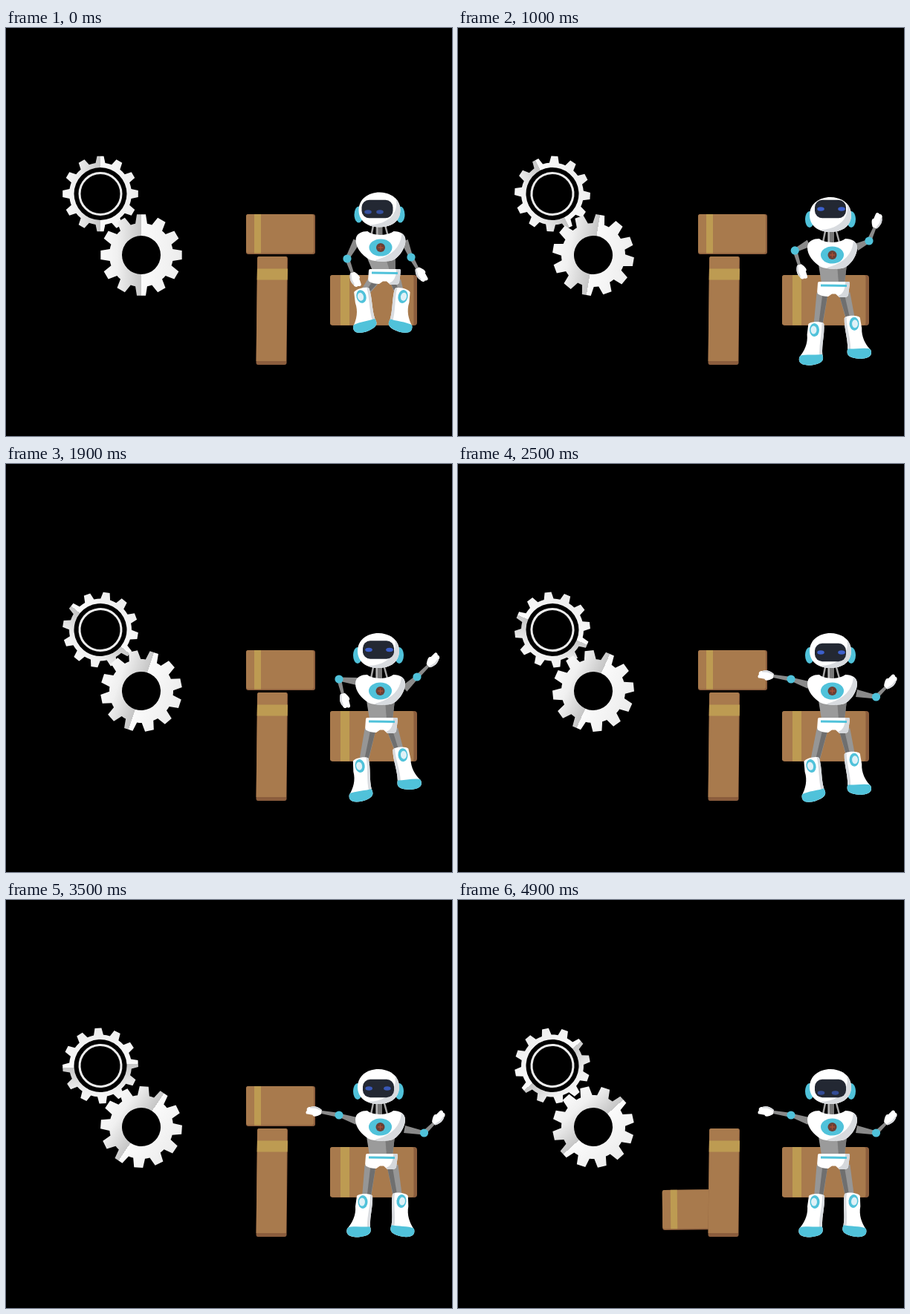
Write an HTML page that moves like this. It is 600 by 550 pixels and loops after 5000 ms.

```html
<!DOCTYPE html>
<html lang="en">
<head>
<meta charset="utf-8">
<title>Robot and boxes</title>
<style>
html, body { margin: 0; width: 100%; height: 100%; overflow: hidden; background: #000; }
svg { display: block; width: 600px; height: 550px; }
</style>
</head>
<body>
<svg viewBox="0 0 600 550">
  <defs>
    <linearGradient id="metal" gradientUnits="userSpaceOnUse" x1="-54" y1="0" x2="54" y2="0">
      <stop offset="0" stop-color="#fafafa"/><stop offset=".2" stop-color="#f0f0f0"/>
      <stop offset=".5" stop-color="#c6c6c6"/><stop offset=".5" stop-color="#fbfbfb"/>
      <stop offset="1" stop-color="#ececec"/>
    </linearGradient>
    <path id="headShape" d="M473 252C473 237 486 228 501 228S529 237 529 252C529 267 517 275 501 275S473 267 473 252Z"/>
    <path id="chestShape" d="M470 296C470 287 478 284 486 284C494 290.500 513 290.500 521 284C530 284 537 288 537 296C537 308 527 320 520 323C512 325.500 496 325.500 488 322C478 316 470 306 470 296Z"/>
    <path id="bootShape" d="M-8-8C-5-12 11-12 13-8C14 6 9 20 10 34C13 43 7 46 -6 47.500C-16 47.500-24 45-21 36C-14 28-9 18-10 6Z"/>
    <clipPath id="headClip"><use href="#headShape"/></clipPath>
    <clipPath id="chestClip"><use href="#chestShape"/></clipPath>
    <clipPath id="bootClip"><use href="#bootShape"/></clipPath>
    <g id="boot">
      <use href="#bootShape" fill="#fff"/>
      <g clip-path="url(#bootClip)">
        <path d="M10-12C11 4 5 20 6 36L18 36V-12Z" fill="#d9dce0"/>
        <path d="M-26 36C-14 31 0 35 14 33V50H-26Z" fill="#50c2da"/>
      </g>
      <ellipse rx="6.500" ry="9" fill="#50c2da"/>
      <ellipse cx="-1" rx="4" ry="5.500" fill="#dff1f7"/>
    </g>
    <g id="hand">
      <path d="M-1-3C4-7 9-9 10-6L17-6C20-6 20-3 18.500-1C20 1 18 4 15 4C10 7 4 6-1 3Z" fill="#fff"/>
      <path d="M-1 1.500L8 3.500L15 2.500V4C10 7 4 6-1 3Z" fill="#d7d9dd"/>
    </g>
  </defs>

  <rect width="600" height="550"/>
  <g id="smallGear">
    <path id="smallTeeth" fill="url(#metal)" fill-rule="evenodd"/>
    <circle r="28" fill="none" stroke="#ececec" stroke-width="3"/>
  </g>
  <path id="bigGear" fill="url(#metal)" fill-rule="evenodd"/>

  <g id="fallingBox">
    <rect x="-46.500" y="-27" width="93" height="54" rx="3" fill="#8b5d3d"/>
    <rect x="-46.500" y="-27" width="91" height="52.500" rx="3" fill="#a87a4d"/>
    <rect x="-35.500" y="-27" width="9" height="52.500" fill="#bd9b52"/>
  </g>
  <path d="M340.500 308H376.500Q379 308 379 311L377.500 452Q377 454 375 454H339Q336.500 454 336.500 451L338 311Q338 308 340.500 308Z" fill="#8b5d3d"/>
  <path d="M340.500 308H376Q378 308 378 311L376.800 449H336.600L338.200 311Q338 308 340.500 308Z" fill="#a87a4d"/>
  <path d="M338 324.500H379L378.700 339.500H337.700Z" fill="#bd9b52"/>
  <rect x="436" y="333" width="117" height="68" rx="4" fill="#8b5d3d"/>
  <rect x="436" y="333" width="112.500" height="67.500" rx="3" fill="#a87a4d"/>
  <rect x="450" y="333" width="12" height="67.500" fill="#bd9b52"/>

  <g fill="#969696"><path id="thighL"/><path id="thighR"/></g>
  <g fill="#6f6f6f"><path id="thighShadeL"/><path id="thighShadeR"/></g>
  <path id="waist" fill="#9b9b9b"/>
  <path id="waistShade" fill="#7a7a7a"/>
  <g id="pelvis">
    <path d="M486 342H525Q527.500 342 527 345L525 360Q524 363 520 363H513L508 358.500H503L498 362Q490 362 485 359Q483 358 483.200 355L484 344Q484 342 486 342Z" fill="#fff"/>
    <path d="M521 342H525Q527.500 342 527 345L525 360Q524 363 520 363H513L511 361Q521 358 521 342Z" fill="#d5d8dc"/>
    <path d="M488 345.500L523 346V349L488 348.500Z" fill="#50c2da"/>
  </g>
  <use id="bootL" href="#boot"/>
  <use id="bootR" href="#boot"/>
  <g fill="#8a8a8a">
    <path id="upperL"/><path id="upperR"/><path id="foreL"/><path id="foreR"/>
  </g>
  <use id="handL" href="#hand"/><use id="handR" href="#hand"/>
  <g fill="#50c2da"><circle id="elbowL" r="5.600"/><circle id="elbowR" r="5.600"/></g>
  <g id="chest">
    <path d="M497 272H506V292H497Z" fill="#777"/>
    <path d="M494 274L491 289M509 274L513 289" stroke="#a7a7a7" stroke-width="2.500"/>
    <path d="M499 272V291" stroke="#b5b5b5" stroke-width="2"/>
    <use href="#chestShape" fill="#fff"/>
    <path d="M532 282C533 302 521 317 496 323L508 330L545 322V282Z" fill="#d8dbdf" clip-path="url(#chestClip)"/>
    <ellipse cx="503.500" cy="306" rx="15.500" ry="11.500" fill="#50c2da"/>
    <circle cx="503.500" cy="306" r="6" fill="#6b3f35"/>
    <path d="M500 306H507M503.500 302.500V309.500" stroke="#a84f35" stroke-width="1.300"/>
  </g>
  <g id="head">
    <ellipse cx="473" cy="258" rx="6" ry="11" fill="#50c2da"/>
    <ellipse cx="529" cy="258" rx="6" ry="11" fill="#50c2da"/>
    <use href="#headShape" fill="#fff"/>
    <path d="M521 228C530 253 517 270 488 272L500 282L535 275V228Z" fill="#d8dbdf" clip-path="url(#headClip)"/>
  </g>
  <rect id="visor" x="-21" y="-12.200" width="42" height="24.400" rx="10" fill="#232833"/>
  <g id="eyes" fill="#3d60cc">
    <ellipse id="eyeL" rx="4.800" ry="2.700"/><ellipse id="eyeR" rx="4.800" ry="2.700"/>
  </g>
</svg>
<script>
const LOOP = 5000, STEP = 100;
const set = (id, attrs) => {
  for (const k in attrs) document.getElementById(id).setAttribute(k, attrs[k]);
};
const place = (id, x, y, turn = 0, flip = 1) =>
  set(id, { transform: `translate(${x} ${y}) rotate(${turn}) scale(${flip} 1)` });
const mix = (a, b, k) => a + (b - a) * k;
const ramp = (t, from, to) => Math.min(1, Math.max(0, (t - from) / (to - from)));
const ease = (t, from, to) => (1 - Math.cos(Math.PI * ramp(t, from, to))) / 2;
const polar = (r, a) => [r * Math.cos(a), r * Math.sin(a)];
const poly = pts => "M" + pts.map(p => p.map(n => n.toFixed(2)).join(" ")).join("L") + "Z";
const ring = r => `M${-r} 0a${r} ${r} 0 1 0 ${2 * r} 0a${r} ${r} 0 1 0 ${-2 * r} 0Z`;

function gearPath(tip, root, hole, tipHalf, rootHalf, teeth = 12) {
  const pts = [];
  for (let i = 0; i < teeth; i++) {
    const mid = (i / teeth) * 2 * Math.PI - Math.PI / 2;
    const add = (r, half) => pts.push(polar(r, mid + half / r));
    add(root, -rootHalf);
    add(tip, -tipHalf);
    add(tip, tipHalf);
    add(root, rootHalf);
    pts.push(polar(root, mid + Math.PI / teeth));
  }
  return poly(pts) + ring(hole);
}

function limb(x1, y1, x2, y2, w1, w2) {
  const len = Math.hypot(x2 - x1, y2 - y1) || 1;
  const nx = (y1 - y2) / len / 2, ny = (x2 - x1) / len / 2;
  return poly([[x1 + nx * w1, y1 + ny * w1], [x2 + nx * w2, y2 + ny * w2],
    [x2 - nx * w2, y2 - ny * w2], [x1 - nx * w1, y1 - ny * w1]]);
}

function drawArm(side, sx, sy, ex, ey, angle, length) {
  const [dx, dy] = polar(length, angle * Math.PI / 180);
  set("upper" + side, { d: limb(sx, sy, ex, ey, 10, 5) });
  set("fore" + side, { d: limb(ex, ey, ex + dx, ey + dy, 6, 4) });
  set("elbow" + side, { cx: ex, cy: ey });
  place("hand" + side, ex + dx, ey + dy, angle);
}

function drawLeg(side, hipX, hipY, x, y, turn) {
  const inner = side === "L" ? 1 : -1;
  const kneeX = x + 5 * inner, kneeY = y - 6;
  set("thigh" + side, { d: limb(hipX, hipY, kneeX, kneeY, 15, 12) });
  set("thighShade" + side, { d: limb(hipX + 4 * inner, hipY, kneeX + 3 * inner, kneeY, 7, 5) });
  place("boot" + side, x, y, turn, inner);
}

function drawTorso(sit) {
  const px = 4 * sit, py = -17 * sit, cx = .5 * sit, cy = -10 * sit;
  const waist = (top, bottom) => poly([[top + cx, 319 + cy], [523 + cx, 319 + cy],
    [520 + px, 344 + py], [bottom + px, 344 + py]]);
  place("head", 1.5 * sit, -6.5 * sit);
  place("chest", cx, cy);
  place("pelvis", px, py);
  set("waist", { d: waist(485, 489) });
  set("waistShade", { d: waist(510, 512) });
}

function drawLegs(t, sit) {
  const land = ease(t, 0, 600);
  const sway = ease(t, 600, 2500) - ease(t, 2500, 3300);
  const kick = Math.sin(Math.PI * ramp(t, 600, 2900));
  const hipX = 4 * sit, hipY = 358 - 17 * sit;
  drawLeg("L", 490 + hipX, hipY, mix(478, 480, land) - 5 * sway, mix(362, 407, land), -15 * (1 - land) - 13 * sway);
  drawLeg("R", 520 + hipX, hipY, mix(534, 532, land) + 2 * kick, mix(362, 406, land) - 14 * kick,
    mix(13, 6, land) - 11 * Math.sqrt(Math.abs(kick)));
}

function drawArms(t) {
  const rise = ease(t, 0, 600), lift = ramp(t, 0, 1900), reach = ease(t, 1900, 2500);
  const wave = -56 + 11 * Math.cos(Math.PI * (Math.min(t, 1900) - 1900) / 300);
  drawArm("L", 472, mix(287, 293, lift) + 5 * reach, mix(459, 448, lift), mix(311, 290, lift),
    mix(70, 76, lift) + 114 * reach, mix(21, 25, reach));
  drawArm("R", 536, mix(287, 303, lift) + 6 * reach, mix(545, 553, rise) + 9.5 * reach,
    mix(309, 287, rise) + 27 * reach, mix(61, wave, rise), mix(18, 22, lift) - 3 * reach);
}

function drawFace(t) {
  const turn = ease(t, 0, 1000), nod = ease(t, 1000, 2500);
  const tire = ease(t, 2500, 4900), drop = ease(t, 4100, 4900);
  const y = 244 + 10 * nod;
  const eyeX = 495 + 7 * turn - 4 * tire, gap = mix(8, 14, turn) - 4.5 * tire;
  const eyeY = y + 4 * (1 - turn) + 6 * drop;
  place("visor", 499.5 + 1.5 * turn, y);
  place("eyeL", eyeX - gap, eyeY);
  place("eyeR", eyeX + gap, eyeY);
  set("eyes", { opacity: .7 + .3 * turn - .35 * tire });
}

function drawBox(t) {
  const p = ramp(t, 3700, 4680);
  const k = p < .5 ? 2 * p * p : 1 - 2 * (1 - p) ** 2;
  place("fallingBox", 369.5 - 48 * k, 278 + 139.5 * k, -9 * Math.sin(Math.PI * p) - .6 * k);
}

function draw(t) {
  const sit = 1 - ease(t, 0, 500);
  place("smallGear", 127, 223.5, -.0267 * t);
  place("bigGear", 182, 306, .0097 * t);
  drawBox(t);
  drawTorso(sit);
  drawLegs(t, sit);
  drawArms(t);
  drawFace(t);
}

set("smallTeeth", { d: gearPath(51, 42, 35.5, 4.5, 6.5) });
set("bigGear", { d: gearPath(55, 43, 26, 6, 8) });

const start = performance.now();
function tick() {
  const t = (performance.now() - start) % LOOP;
  draw(Math.floor(t / STEP) * STEP);
  requestAnimationFrame(tick);
}
tick();
</script>
</body>
</html>
```
